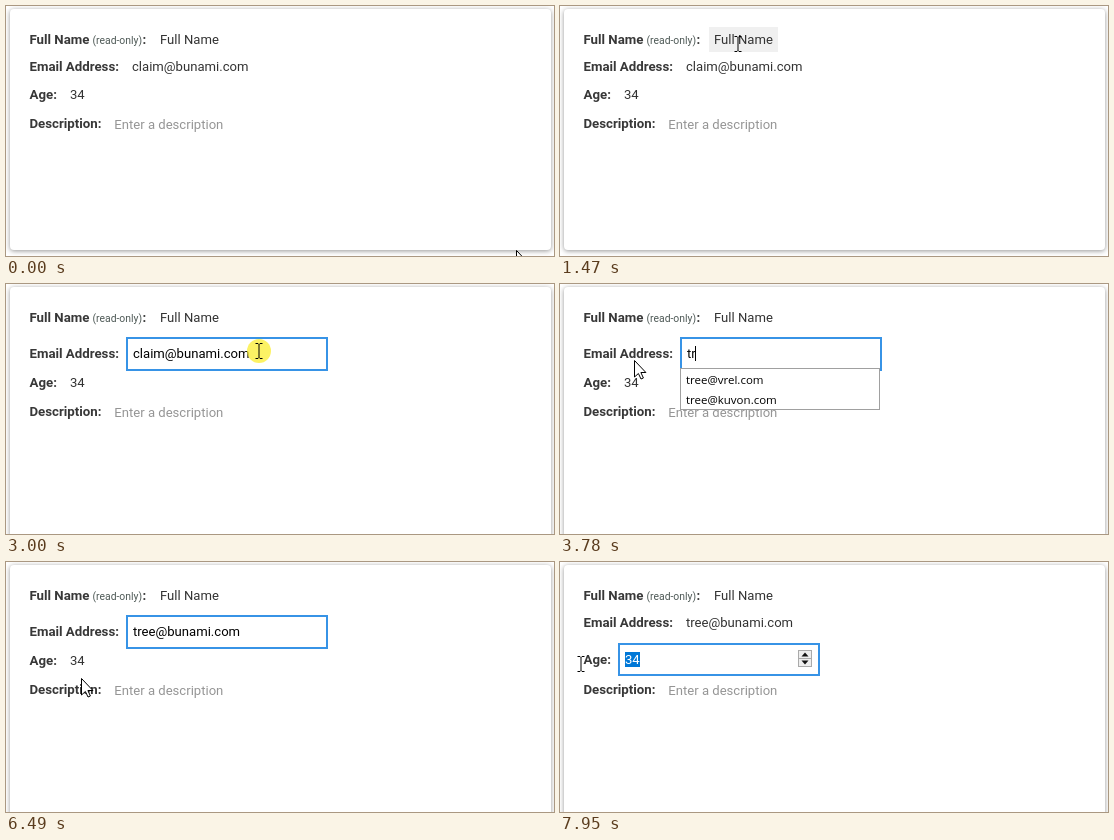
An HTML page that plays this animation: 548 px wide and 250 px high, repeating every 8000 ms.

```html
<!DOCTYPE html>
<html lang="en">
<head>
<meta charset="utf-8">
<title>Inline edit form</title>
<style>
html, body { margin: 0; width: 100%; height: 100%; overflow: hidden; background: #fff; }
#stage { position: relative; width: 548px; height: 250px; overflow: hidden; background: #fff; }
#card { position: absolute; left: 4px; top: 3px; width: 541px; height: 241px; border-radius: 4px;
  background: #fff; box-shadow: 0 1px 5px rgba(0, 0, 0, .42); }
svg { position: absolute; left: 0; top: 0; }
text { font: 13.1px Roboto, Arial, sans-serif; fill: #333; white-space: pre; }
.label { font-size: 13.25px; font-weight: 700; fill: #383838; }
.small { font-size: 10.4px; fill: #4f5a57; }
.hint { fill: #959595; }
.typed { fill: #000; }
.white { fill: #fff; }
.item { font: 11.5px "Open Sans", "Noto Sans", sans-serif; fill: #000; }
.hover { fill: #f0f0f0; }
.sel { fill: #0078d7; }
.field { stroke: #3793e6; stroke-width: 2; fill: #fff; }
.button { fill: #eee; stroke: #aaa; }
#dot { fill: #fbed28; opacity: .72; }
#cursor path { stroke: #000; stroke-width: 1; stroke-linejoin: round; fill: #fff; }
#cursor .line { fill: none; }
</style>
</head>
<body>
<div id="stage">
  <div id="card"></div>
  <svg width="548" height="250">
    <rect class="hover" id="hFull" x="149" y="21" width="69" height="25"/>
    <text class="label" x="23.5" y="38">Full Name</text>
    <text class="small" x="86.5" y="38">(read-only)</text>
    <text class="label" x="136.5" y="38">:</text>
    <text x="154" y="38">Full Name</text>

    <g id="desc">
      <text class="label" x="23.5" y="122">Description:</text>
      <text class="hint" x="108.3" y="123">Enter a description</text>
    </g>

    <g id="age">
      <rect class="hover" id="hAge" x="59" y="76" width="25" height="25"/>
      <text class="label" x="23.5" y="93">Age:</text>
      <text id="ageText" x="64" y="93">34</text>
    </g>
    <g id="ageBox">
      <rect class="field" x="59" y="82" width="200" height="31"/>
      <rect id="ageSel" class="sel" x="65" y="90" width="15" height="15"/>
      <text id="ageTyped" x="65" y="102">34</text>
      <rect class="button" x="238.5" y="88.5" width="13" height="8"/>
      <rect class="button" x="238.5" y="96.5" width="13" height="8"/>
      <path d="M241.5 94.5h7l-3.5-4zM241.5 98.5h7l-3.5 4z" fill="#111"/>
    </g>

    <g id="mail">
      <rect class="hover" id="hMail" x="121" y="48" width="127" height="25"/>
      <text class="label" x="23.5" y="65">Email Address:</text>
      <text id="mailText" x="126" y="65"></text>
    </g>
    <g id="mailBox">
      <rect class="field" x="121" y="54" width="200" height="32"/>
      <text class="typed" id="typed" x="127" y="74"></text>
      <rect class="sel" id="mailSel" y="62" height="15"/>
      <text class="white" id="selText" y="74"></text>
      <rect id="caret" y="62" width="1" height="15" fill="#000"/>
    </g>
    <g id="list">
      <rect x="120.5" y="84.5" width="199" height="41" fill="#fff" stroke="#a0a0a0"/>
      <text class="item" x="126" y="100">tree@vrel.com</text>
      <text class="item" x="126" y="120">tree@kuvon.com</text>
    </g>

    <circle id="dot" r="12"/>
    <g id="cursor">
      <path id="arrow" d="M-.5-.5V16L3.4 12.5 6 18 8.4 17 5.9 11.5H10.9Z"/>
      <g id="hand">
        <path d="M-2 1.5C-2-.8 2-.8 2 1.5V9C2 7 5.5 7 5.5 9.3 5.5 7.8 8.8 8 8.8 10.3 9 9 12 9.3 12 11.8V16C12 19 10 20 10 23H0C0 20-3 17-5 13.5-6.2 11-3.5 10.2-2 12.5Z"/>
        <path class="line" d="M-2 12.5V1.5M2 8V12M5.5 9V12.5M8.8 10V13"/>
      </g>
      <path id="beam" class="line" d="M-3.5-7.5H-1L0-6.5 1-7.5H3.5M0-6.5V6.5M-3.5 7.5H-1L0 6.5 1 7.5H3.5"/>
    </g>
  </svg>
</div>
<script>
const LOOP = 8000, STEP = 77.2, LEAD = 10;
const OLD = "claim@bunami.com", NEW = "tree@bunami.com";

// Pointer stops: step, x, y; "s" eases into the stop
const path = [
  [0, 511, 245], [9, 189, 33, "s"], [11, 181, 32], [16, 181, 32],
  [26, 167, 61, "s"], [27, 166, 62], [29, 166, 63], [31, 159, 65], [32, 159, 65],
  [36, 246, 65, "s"], [37, 248, 65], [38, 248, 65],
  [39, 253, 67], [43, 13, 74, "s"], [45, 75, 77], [79, 75, 77],
  [84, 76, 117, "s"], [87, 74, 98, "s"], [92, 74, 98],
  [99, 127, 99, "s"], [100, 126, 99], [101, 103, 98], [102, 19, 101], [103, 21, 102]
];
// Steps with the button held
const presses = [[12, 15], [29, 31], [37, 45], [88, 92], [100, 103]];
// Step, number of typed characters
const typing = [[48, 1], [49, 2], [50, 3], [52, 4], [55, 5], [60, 6], [61, 7], [62, 8],
  [63, 9], [64, 10], [65, 11], [68, 12], [69, 13], [71, 15]];
const caretOff = [[58, 60], [71, 78], [80, 90]];

const el = {};
document.querySelectorAll("[id]").forEach(e => el[e.id] = e);
const pen = document.createElement("canvas").getContext("2d");
pen.font = "13.1px Roboto, Arial, sans-serif";
const width = s => pen.measureText(s).width;

const show = (e, on) => e.style.display = on ? "" : "none";
const move = (e, x, y) => e.setAttribute("transform", `translate(${x} ${y})`);
const within = (list, k) => list.some(([a, b]) => k >= a && k < b);
const hit = ([x, y], l, t, r, b) => x >= l && x < r && y >= t && y < b;

function pointer(k) {
  const i = path.findIndex(p => p[0] >= k);
  if (i < 0) return path[path.length - 1].slice(1, 3);
  if (i === 0) return path[0].slice(1, 3);
  const a = path[i - 1], b = path[i];
  let u = (k - a[0]) / (b[0] - a[0]);
  if (b[3]) u = u * u * (3 - 2 * u);
  return [1, 2].map(j => Math.round(a[j] + (b[j] - a[j]) * u));
}

function drawMail(k) {
  const last = typing.filter(p => p[0] <= k).pop();
  const text = last ? NEW.slice(0, last[1]) : OLD;
  el.typed.textContent = text;

  // Dragging selects from the pointer to the end of the text
  const picking = k >= 39 && k < 48;
  show(el.mailSel, picking);
  show(el.selText, picking);
  if (picking) {
    const x = pointer(Math.min(k, 43))[0] - 127;
    let n = 0;
    while (n < OLD.length && width(OLD.slice(0, n + 1)) < x + 3) n++;
    const from = 127 + width(OLD.slice(0, n));
    el.mailSel.setAttribute("x", from);
    el.mailSel.setAttribute("width", 127 + width(OLD) - from);
    el.selText.setAttribute("x", from);
    el.selText.textContent = OLD.slice(n);
  }
  show(el.caret, !picking && !within(caretOff, k));
  el.caret.setAttribute("x", Math.round(126.6 + width(text)));
}

function draw(t) {
  const k = Math.floor((t + LEAD) / STEP);
  const mailEdit = k >= 30 && k < 90, ageEdit = k >= 92;
  const down = mailEdit || ageEdit ? 10 : 0;
  const p = pointer(k), held = within(presses, k);

  el.card.style.height = 241 + down + "px";
  move(el.desc, 0, down);
  move(el.age, 0, ageEdit ? 9 : down);
  move(el.mail, 0, mailEdit ? 9 : 0);

  el.mailText.textContent = k < 90 ? OLD : NEW;
  show(el.mailText, !mailEdit);
  show(el.mailBox, mailEdit);
  show(el.list, k >= 48 && k < 60);
  if (mailEdit) drawMail(k);

  show(el.ageText, !ageEdit);
  show(el.ageBox, ageEdit);
  show(el.ageSel, k >= 102);
  el.ageTyped.setAttribute("class", k >= 102 ? "white" : "typed");

  const onFull = hit(p, 149, 21, 218, 46);
  const onMail = !mailEdit && hit(p, 121, 48, 248, 73);
  const onAge = !ageEdit && hit(p, 59, 76 + down, 84, 101 + down);
  const onBox = mailEdit && hit(p, 121, 54, 321, 86) || ageEdit && hit(p, 59, 82, 259, 113);
  show(el.hFull, onFull);
  show(el.hMail, onMail);
  show(el.hAge, onAge);

  const hand = onMail || onAge;
  const beam = !hand && (onFull || onBox || held || k >= 102);
  show(el.hand, hand);
  show(el.beam, beam);
  show(el.arrow, !hand && !beam);
  show(el.dot, held);
  move(el.dot, ...p);
  move(el.cursor, ...p);
}

const start = performance.now();
function tick() {
  draw((performance.now() - start) % LOOP);
  requestAnimationFrame(tick);
}
tick();
</script>
</body>
</html>
```
